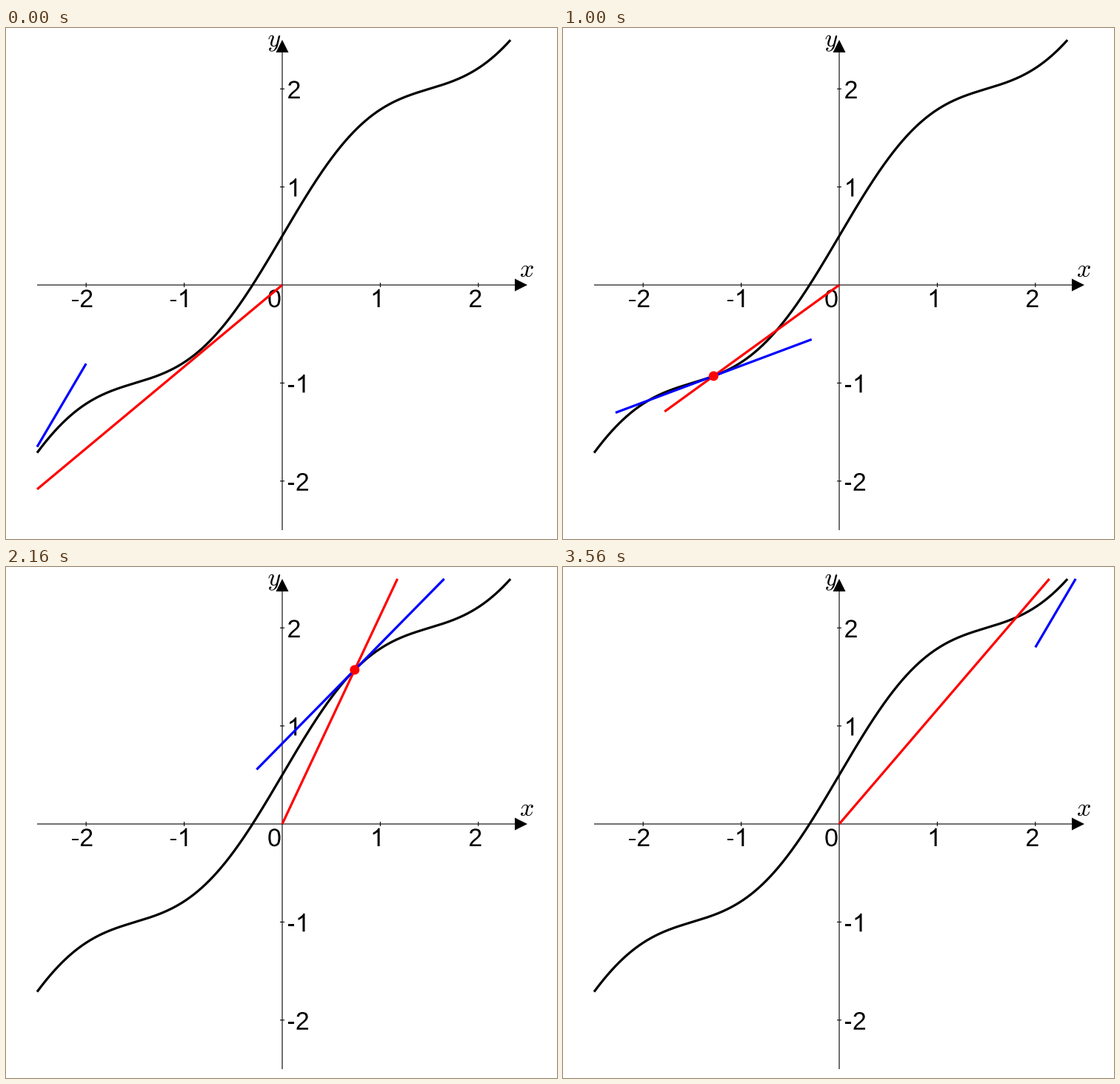
Write a matplotlib script that moves like this. It is 744 by 690 pixels and loops after 3.58 s.

```python
import numpy as np
import matplotlib.pyplot as plt
from matplotlib.animation import FuncAnimation
from matplotlib.patches import Circle, PathPatch, Polygon
from matplotlib.path import Path
from matplotlib.textpath import TextPath

plt.rcParams["font.family"] = "Liberation Sans"
plt.rcParams["mathtext.fontset"] = "cm"

W, H, DPI = 744, 690, 100
OX, OY, UNIT = 373.0, 347.0, 132.4   # origin and unit length in pixels
LIM = 2.5
FRAMES, STEPS = 179, 199
PX = 1 / UNIT                        # one pixel in plot units
PT = 72 / DPI                        # one pixel in points
EM = 34

# The sweep runs over STEPS even steps but skips a few on the way.
SHOWN = [0, 14, 27, 50, 54, 81, 87, 108, 138, 178]
STEP = [0, 16, 31, 57, 66, 95, 102, 124, 155, 199]


def f(x):
    return 0.5 + x + np.sin(2 * np.pi * x / 3) / 3


def slope(x):
    return 1 + 2 * np.pi / 9 * np.cos(2 * np.pi * x / 3)


def to_plot(px, py):
    return (px - OX) / UNIT, (OY - py) / UNIT


fig = plt.figure(figsize=(W / 100, H / 100), dpi=DPI, facecolor="white")
ax = fig.add_axes([0, 0, 1, 1])
ax.set_axis_off()
ax.set_xlim(-OX / UNIT, (W - OX) / UNIT)
ax.set_ylim((OY - H) / UNIT, OY / UNIT)


def stroke(xs, ys, color, width, z):
    line, = ax.plot(xs, ys, color=color, lw=width * PT, zorder=z,
                    solid_capstyle="butt", snap=False)
    return line


def glyphs(text, px, py, size=EM):
    x, y = to_plot(px, py)
    path = TextPath((0, 0), text, size=size)
    verts = path.vertices * PX + (x, y)
    ax.add_patch(PathPatch(Path(verts, path.codes), fc="black", lw=0, zorder=2))


def one(px, py):
    """A digit one without a foot."""
    outline = [(763, 0), (583, 0), (583, 1147), (505, 1080), (412, 1023),
               (315, 967), (223, 930), (223, 1104), (365, 1180), (487, 1276),
               (590, 1375), (647, 1472), (763, 1472)]
    pts = np.array(outline) * EM * PX / 2048 + to_plot(px, py)
    ax.add_patch(Polygon(pts, fc="black", lw=0, zorder=2))


def number(n, left, base):
    if n < 0:
        glyphs("-", left, base)
        left += 0.333 * EM
    if abs(n) == 1:
        one(left, base)
    else:
        glyphs(str(abs(n)), left, base)


def draw_axes():
    tick, head, half = 3 * PX, 17 * PX, 8.5 * PX
    stroke([-LIM, LIM - head], [0, 0], "black", 1.1, 1)
    stroke([0, 0], [-LIM, LIM - head], "black", 1.1, 1)
    for n in (-2, -1, 1, 2):
        stroke([n, n], [-tick, tick], "black", 1.1, 1)
        stroke([-tick, tick], [n, n], "black", 1.1, 1)
        width = (0.556 + 0.333 * (n < 0)) * EM
        shift = 5.2 if n < 0 else 4
        number(n, OX + n * UNIT - shift - width / 2, OY + 30)
        number(n, OX + 6.5, OY - n * UNIT + 12.9)
    number(0, 353, OY + 30)
    tip = np.array([(LIM, 0), (LIM - head, half), (LIM - head, -half)])
    for pts in (tip, tip[:, ::-1]):
        ax.add_patch(Polygon(pts, fc="black", lw=0, zorder=2))
    glyphs("$x$", 694, 336)
    glyphs("$y$", 353.5, 25)


def segment(x0, y0, m, a, b):
    """Ends of the line through (x0, y0) on [a, b], cut to the plot box."""
    low, high = sorted((x0 + (s * LIM - y0) / m) for s in (-1, 1))
    xs = np.array([max(a, low, -LIM), min(b, high, LIM)])
    return xs, y0 + m * (xs - x0)


draw_axes()
curve_x = np.linspace(-LIM, LIM, 2001)
curve_x = curve_x[f(curve_x) <= LIM]
stroke(curve_x, f(curve_x), "black", 3.2, 3)

ray = stroke([], [], "red", 3.2, 4)
tangent = stroke([], [], "blue", 3.2, 5)
dot = Circle((0, 0), 6.5 * PX, fc="red", lw=0, zorder=6)
ax.add_patch(dot)


def update(i):
    step = round(float(np.interp(i, SHOWN, STEP)))
    x = -3 + 6 * step / STEPS
    y = f(x)
    ray.set_data(*segment(0, 0, y / x, min(0, x - 0.5) if x < 0 else 0,
                          0 if x < 0 else x + 0.5))
    tangent.set_data(*segment(x, y, slope(x), x - 1, x + 1))
    dot.center = (x, y)
    dot.set_visible(bool(abs(x) <= LIM and abs(y) <= LIM))
    return ray, tangent, dot


anim = FuncAnimation(fig, update, frames=FRAMES, interval=20,
                     repeat=True, repeat_delay=0, blit=False)
plt.show()
```
